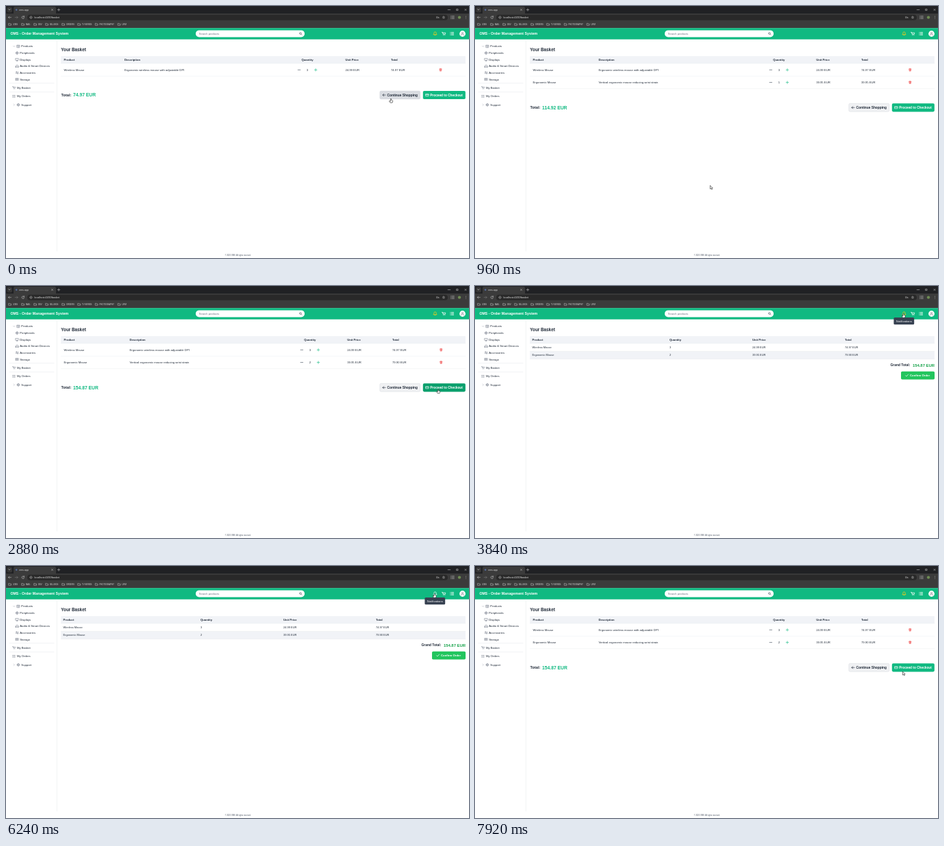
An HTML page for the animation above (8 s loop, 676x368 px).

```html
<!DOCTYPE html>
<html lang="en">
<head>
<meta charset="utf-8">
<title>Order basket</title>
<style>
  html, body { margin: 0; width: 100%; height: 100%; overflow: hidden; background: #fff; }
  svg { display: block; width: 676px; height: 368px; font-family: "Liberation Sans", Arial, sans-serif; }
  text { white-space: pre; }
</style>
</head>
<body>
<svg id="stage" viewBox="0 0 676 368" xmlns="http://www.w3.org/2000/svg"></svg>
<script>
const LOOP = 8000, STEP = 120;
const GREEN = '#10b981', INK = '#1f2937', RULE = '#e5e7eb', HEAD = '#f1f3f7';

const rect = (x, y, w, h, fill, r = 0, more = '') =>
  `<rect x="${x}" y="${y}" width="${w}" height="${h}" rx="${r}" fill="${fill}" ${more}/>`;
const line = (d, color, w = 0.6) =>
  `<path d="${d}" fill="none" stroke="${color}" stroke-width="${w}" stroke-linecap="round" stroke-linejoin="round"/>`;
const at = (x, y, body) => `<g transform="translate(${x} ${y})">${body}</g>`;
// y is the vertical middle of the capitals
const text = (x, y, str, size = 4.22, fill = INK, more = '') =>
  `<text x="${x}" y="${y + size * 0.36}" font-size="${size}" fill="${fill}" ${more}>${str}</text>`;
const bold = (x, y, str, size = 4.22, fill = INK, more = '') =>
  text(x, y, str, size, fill, 'font-weight="700" ' + more);
const group = (id, body) => `<g id="${id}">${body}</g>`;

const icons = {
  folder: 'M-1.7 -1.3h1.2l.5 .6h1.7v2.2h-3.4z',
  box: 'M-1.8 -1.8h3.6v3.6h-3.6zM-1.8 -.6h3.6M0 -.6v2.4',
  globe: 'M-1.8 0a1.8 1.8 0 1 0 3.6 0a1.8 1.8 0 1 0 -3.6 0M-1.8 0h3.6M0 -1.8v3.6',
  screen: 'M-2 -1.7h4v2.7h-4zM-1 2h2M0 1v1',
  phones: 'M-1.8 1.6v-1.4a1.8 1.8 0 0 1 3.6 0v1.4M-1.8 .4h.8v1.4h-.8zM1 .4h.8v1.4h-.8z',
  plug: 'M-2 -.8h4M-2 1h4M-.8 -1.8v1.6M.9 .2v1.7',
  disk: 'M-1.9 -1.5h3.8v1.3h-3.8zM-1.9 .3h3.8v1.4h-3.8z',
  cart: 'M-2.5 -2.1h1l.9 3h2.7l.7 -2.2h-4.1M-.3 2.1h.1M1.8 2.1h.1',
  list: 'M-1.1 -1.8h3.4M-1.1 0h3.4M-1.1 1.8h3.4M-2.5 -1.8h.1M-2.5 0h.1M-2.5 1.8h.1',
  bell: 'M-2.3 1.3c.9 -.9 .6 -1.8 .8 -2.6a1.55 1.55 0 0 1 3 0c.2 .8 -.1 1.7 .8 2.6zM-.6 2.3h1.2',
  trash: 'M-1.6 -1.2h3.2M-1.3 -1.2l.2 2.9h2.2l.2 -2.9M-.6 -1.9h1.2M-.4 -.3v1.2M.4 -.3v1.2',
  card: 'M-2 -1.5h4v3h-4zM-2 -.5h4',
  back: 'M2 0h-4m1.6 -1.6l-1.6 1.6l1.6 1.6',
  check: 'M-1.9 .1l1.3 1.3l2.6 -2.8',
  right: 'M-.6 -1.2l1.2 1.2l-1.2 1.2',
  down: 'M-1.2 -.6l1.2 1.2l1.2 -1.2',
  cross: 'M-1 -1l2 2M1 -1l-2 2',
  minus: 'M-1.8 0h3.6',
  plus: 'M-1.8 0h3.6M0 -1.8v3.6',
  square: 'M-1 -1h2v2h-2z',
  star: 'M0 -1.7l.5 1.1h1.2l-.9 .8l.3 1.3l-1.1 -.7l-1.1 .7l.3 -1.3l-.9 -.8h1.2z',
  find: 'M-1.7 -.4a1.4 1.4 0 1 0 2.8 0a1.4 1.4 0 1 0 -2.8 0M.6 .7l1.3 1.3'
};
const icon = (name, x, y, color = '#6b7280', w = 0.5) => at(x, y, line(icons[name], color, w));

function browser() {
  const pale = '#d6d6d6';
  const marks = [[4, 'JOBS'], [23, 'MAIL'], [41, 'DEV'], [58, 'BILLINGS'], [82, 'ORDERS'],
    [105, 'TV SERIES'], [130.5, 'PHOTOGRAPHY'], [163.5, 'URM']];
  return rect(0, 0, 676, 12, '#202124') + rect(0, 11, 676, 21.3, '#3b3b3b') +
    rect(1.5, 1.5, 7.5, 8, '#373737', 2) + icon('down', 5, 5.3, pale, 0.6) +
    rect(11, 1, 62, 12, '#3b3b3b', 2) + '<circle cx="15.2" cy="5.6" r="1.3" fill="#536a9c"/>' +
    text(19, 5.6, 'oms-app', 3.6, pale) + icon('cross', 67.5, 5.5, pale) + icon('plus', 77, 5.5, pale) +
    icon('minus', 647, 5.5, pale) + icon('square', 659, 5.5, pale) + icon('cross', 671, 5.5, pale) +
    icon('back', 5.5, 16.6, pale) + at(15.2, 16.6, `<g transform="scale(-1 1)">${line(icons.back, '#858585', 0.5)}</g>`) +
    line('M26.4 15.7a1.8 1.8 0 1 0 .2 1.5M26.6 14.6v1.3h-1.3', pale, 0.5) +
    rect(31, 12.7, 614, 8, '#292929', 4) + icon('globe', 36.5, 16.7, '#aaa', 0.4) +
    text(41.5, 16.7, 'localhost:4200/basket', 3.75, '#e4e4e4') +
    text(628, 16.6, 'G⁄a', 3, pale) + icon('star', 639, 16.7, pale, 0.4) +
    icon('list', 652, 16.6, pale, 0.5) + '<circle cx="662" cy="16.6" r="2.2" fill="#6d8b53"/>' +
    [15, 16.6, 18.2].map(y => `<circle cx="671.5" cy="${y}" r=".4" fill="${pale}"/>`).join('') +
    marks.map(([x, s]) => icon('folder', x + 1.8, 26.7, pale, 0.45) + text(x + 6, 26.7, s, 2.75, pale)).join('');
}

function topBar() {
  return rect(0, 32.2, 676, 16.5, GREEN) + bold(6.4, 40.6, 'OMS - Order Management System', 5.27, '#fff') +
    rect(277, 35.4, 159, 10.1, '#fff', 5) + text(281.8, 40.6, 'Search products', 4.05, '#6b7280') +
    icon('find', 430.2, 40.4, '#4b5563', 0.6) +
    `<g id="bell" stroke="#facc15">${at(626.5, 40.2,
      `<path d="${icons.bell}" fill="none" stroke-width=".75" stroke-linejoin="round" stroke-linecap="round"/>`)}</g>` +
    icon('cart', 639, 40.5, '#fff', 0.75) + icon('list', 651.3, 40.4, '#fff', 0.8) +
    '<circle cx="666.5" cy="40.5" r="4.4" fill="#fff"/><circle cx="666.5" cy="39.4" r="1.1" fill="none" stroke="#4b5563" stroke-width=".5"/>' +
    line('M664.4 42.8a2.1 2 0 0 1 4.2 0', '#4b5563', 0.5);
}

function sidebar() {
  const subs = [['globe', 'Peripherals', 68.6], ['screen', 'Displays', 78.2],
    ['phones', 'Audio &amp; Smart Devices', 87.8], ['plug', 'Accessories', 97.4], ['disk', 'Storage', 107]];
  const main = [['cart', 'My Basket', 119.3], ['list', 'My Orders', 131.8]];
  return line('M74.3 49V358', '#e3e5e8', 0.5) + line('M5 112.7H70M5 125.6H70', RULE, 0.5) +
    icon('down', 11.8, 58.9, '#9ca3af') + icon('box', 18, 58.9) + text(22.3, 58.9, 'Products', 4.25) +
    subs.map(([i, s, y]) => icon(i, 16.2, y) + text(20.2, y, s, 4.25)).join('') +
    main.map(([i, s, y]) => at(11.5, y, `<g transform="scale(.8)">${line(icons[i], '#6b7280', 0.6)}</g>`) +
      text(15.9, y, s, 4.25)).join('') +
    icon('right', 11.8, 144.3, '#9ca3af') + icon('globe', 18, 144.3) + text(22.3, 144.3, 'Support', 4.25);
}

const tableHead = cols => rect(80.3, 73.2, 590.5, 10.4, HEAD) +
  line('M80.3 83.6H670.8', RULE, 0.5) + cols.map(([x, s]) => bold(x, 78.4, s, 4.2)).join('');

function basketRow(y, cols, name, about, qty, price, total, extra = '') {
  const [desc, mid, unit, sum, bin] = cols, id = extra && ' id="qty"';
  return text(84.5, y, name) + text(desc, y, about) + icon('minus', mid - 12, y, '#4b5563', 0.65) +
    text(mid, y, `<tspan${id}>${qty}</tspan>`, 4.22, INK, 'text-anchor="middle"') +
    (extra ? rect(mid + 9, y - 3.2, 6.4, 6.4, '#d9f7ea', 1.5, 'id="plusHover"') : '') +
    icon('plus', mid + 12.2, y, GREEN, 0.6) + text(unit, y, price) +
    text(sum, y, extra ? `<tspan id="rowSum">${total}</tspan>` : total) +
    icon('trash', bin, y, '#ef4444', 0.6) + line(`M80.3 ${y + 9.1}H670.8`, '#eceef1', 0.5);
}

function basketHead([desc, mid, unit, sum]) {
  return tableHead([[84.5, 'Product'], [desc, 'Description'], [mid - 8.5, 'Quantity'], [unit, 'Unit Price'], [sum, 'Total']]);
}

function basketFoot(y, id, sum) {
  return bold(80.5, y, 'Total:', 5.63) + bold(98, y, `<tspan id="${id}Sum">${sum}</tspan>`, 6.76, GREEN) +
    rect(545.8, y - 6, 59, 12, '#f0f1f3', 1.8, `id="${id}Shop" stroke="#d1d5db" stroke-width=".4"`) +
    icon('back', 552, y, INK, 0.65) + bold(556.6, y, 'Continue Shopping', 4.8) +
    rect(608.8, y - 6.1, 62, 12.2, GREEN, 1.8, `id="${id}Pay"`) +
    icon('card', 615, y, '#fff', 0.6) + bold(619.2, y, 'Proceed to Checkout', 4.77, '#fff');
}

function pages() {
  const one = [173, 440, 495.4, 562, 634.5], two = [180.5, 443.8, 498.2, 564, 635.2];
  const mouse = ['Wireless Mouse', 'Ergonomic wireless mouse with adjustable DPI', 3, '24.99 EUR', '74.97 EUR'];
  const row = (y, x, name, cells) => text(83.5, y, name, 3.98) +
    [284, 405, 540].map((cx, i) => text(cx, y, cells[i], 3.98)).join('');
  return group('single', basketHead(one) + basketRow(93.3, one, ...mouse) + basketFoot(130, 'one', '74.97 EUR')) +
    group('double', basketHead(two) + basketRow(93.3, two, ...mouse) +
      basketRow(111.6, two, 'Ergonomic Mouse', 'Vertical ergonomic mouse reducing wrist strain', 1, '39.95 EUR', '39.95 EUR', true) +
      basketFoot(148.3, 'two', '114.92 EUR')) +
    group('checkout', tableHead([[83.5, 'Product'], [284, 'Quantity'], [405, 'Unit Price'], [540, 'Total']]) +
      rect(80.3, 95.4, 590.5, 11.2, HEAD) + line('M80.3 95.3H670.8M80.3 106.6H670.8', RULE, 0.5) +
      row(90, 0, 'Wireless Mouse', [3, '24.99 EUR', '74.97 EUR']) +
      row(101, 0, 'Ergonomic Mouse', [2, '39.95 EUR', '79.90 EUR']) +
      bold(606.5, 115.3, 'Grand Total:', 4.93) + bold(671, 116, '154.87 EUR', 5.9, '#16a34a', 'text-anchor="end"') +
      rect(622, 124.7, 49, 11.8, '#22c55e', 1.8) + icon('check', 630.5, 130.6, '#fff', 0.7) +
      bold(635, 130.6, 'Confirm Order', 4.25, '#fff'));
}

function overlays() {
  const notes = [[56.2, 'Your basket has been checked'], [61.2, 'out.'], [76, 'Redirecting to your basket...'],
    [91.2, 'Ergonomic Mouse quantity'], [96.2, 'increased'], [111.2, 'Redirecting to your basket...']];
  return group('popup', rect(546.3, 45.2, 84.4, 84, '#fff', 2.5, 'filter="url(#soft)"') +
      rect(552.6, 52, 69, 64, '#f8fafc') + rect(552.4, 52, 1.1, 64, '#5b8fd6') +
      line('M554 71.2H621M554 86H621M554 106H621', RULE, 0.4) +
      notes.map(([y, s]) => text(556, y, s, 4.2)).join('') +
      [67, 82.3, 102].map(y => text(556, y, '5:38 PM', 2.9, '#4b5563')).join('') +
      rect(621.8, 50.5, 5, 66, '#fafafa') + rect(623, 55, 2.7, 8.4, '#8b8b8b') +
      '<path d="M623 53l1.4 -1.7l1.4 1.7zM623 113.5l1.4 1.7l1.4 -1.7z" fill="#555"/>' +
      bold(553.8, 121, 'Clear All', 3.8, GREEN)) +
    group('tip', rect(611.4, 46, 29.8, 10.3, '#374151', 1.5) + text(626.3, 51.1, 'Notifications', 4.22, '#fff', 'text-anchor="middle"'));
}

const shape = (id, d) => `<path id="${id}" d="${d}" fill="#fff" stroke="#111" stroke-width=".55" stroke-linejoin="round"/>`;

document.getElementById('stage').innerHTML =
  '<defs><filter id="soft" x="-10%" y="-10%" width="120%" height="125%"><feDropShadow dx="0" dy="1" stdDeviation="1.4" flood-opacity=".3"/></filter></defs>' +
  rect(0, 0, 676, 368, '#fff') + browser() + topBar() + sidebar() + bold(80.3, 63.8, 'Your Basket', 6.34) +
  pages() + text(338.7, 363.7, '© 2025 OMS. All rights reserved.', 2.6, '#4b5563', 'text-anchor="middle"') +
  overlays() + group('cursor',
    shape('arrow', 'M0 0V5.2L1.3 4.1L2.2 6L3.1 5.6L2.3 3.8H3.8Z') +
    shape('hand', 'M-.6 .6Q0 -.3 .6 .6V2.4L2.3 2.9Q2.9 3.2 2.7 4L2.1 6.2H-1L-2.6 3.9Q-2.3 3.1 -1.5 3.6L-.6 4.2Z'));

const el = Object.fromEntries([...document.querySelectorAll('[id]')].map(n => [n.id, n]));
const show = (id, on) => { el[id].style.display = on ? '' : 'none'; };
const within = (t, spans) => spans.some(([a, b]) => t >= a && t < b);

// time, x, y of the pointer tip
const path = [[0, 562, 135], [120, 562, 135], [720, 343.3, 262], [960, 343.3, 262], [1440, 456, 111],
  [1680, 457, 112], [1800, 462.3, 118.3], [2520, 631, 150.5], [3120, 631, 150.5], [3840, 625.5, 40],
  [4080, 625.5, 40], [4680, 564, 120.3], [4920, 564, 120.3], [5040, 575, 120.3], [5520, 575, 120.3],
  [6120, 625.5, 40], [6360, 625.5, 40], [6960, 634, 163], [7200, 634, 160], [7440, 628, 156],
  [7680, 628, 156], [7920, 624.3, 154], [8000, 624.3, 154]];

function pointer(t) {
  const i = path.findIndex(p => p[0] > t), [t0, x0, y0] = path[i - 1], [t1, x1, y1] = path[i];
  const k = (t - t0) / (t1 - t0), e = k * k * (3 - 2 * k);
  return [x0 + (x1 - x0) * e, y0 + (y1 - y0) * e];
}

function draw(t) {
  const checkout = within(t, [[3120, 7200]]), more = t >= 1560;
  show('single', t < 600);
  show('double', t >= 600 && !checkout);
  show('checkout', checkout);
  show('popup', within(t, [[3960, 4920]]));
  show('tip', within(t, [[3840, 3960], [6120, 6480]]));
  show('plusHover', within(t, [[1440, 1920]]));
  el.qty.textContent = more ? 2 : 1;
  el.rowSum.textContent = more ? '79.90 EUR' : '39.95 EUR';
  el.twoSum.textContent = more ? '154.87 EUR' : '114.92 EUR';
  el.oneShop.setAttribute('fill', t < 240 ? '#d9dce1' : '#f0f1f3');
  el.twoPay.setAttribute('fill', within(t, [[2520, 3120]]) ? '#0a9f6c' : GREEN);
  el.bell.setAttribute('stroke', within(t, [[4920, 7680]]) ? '#fff' : '#facc15');
  const hand = within(t, [[0, 240], [1440, 1800], [2640, 3240], [3840, 4200], [4680, 5040], [6120, 6480]]);
  show('hand', hand);
  show('arrow', !hand);
  el.cursor.setAttribute('transform', `translate(${pointer(t).join(' ')})`);
}

function tick() {
  const t = performance.now() % LOOP;
  draw(Math.floor(t / STEP) * STEP);
  requestAnimationFrame(tick);
}
tick();
</script>
</body>
</html>
```
